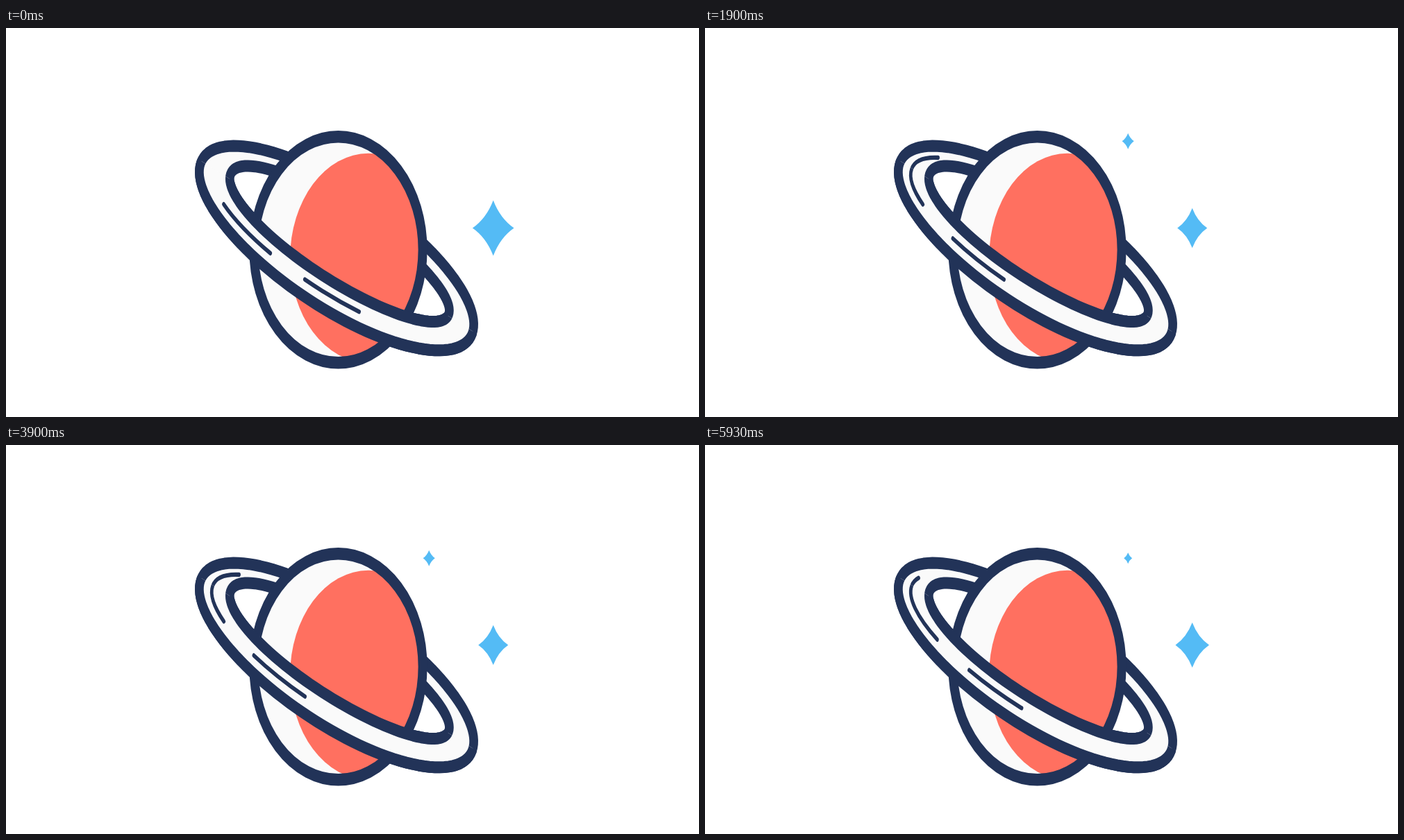
Animation of 998 by 561 pixels, one loop 6010 ms. Source, as an HTML page with a canvas:

```html
<!DOCTYPE html>
<html lang="en">
<head>
<meta charset="utf-8">
<title>Planet and rocket</title>
<style>
html, body { margin: 0; width: 100%; height: 100%; overflow: hidden; background: #fff; }
canvas { display: block; }
</style>
</head>
<body>
<canvas id="stage" width="998" height="561"></canvas>
<script>
const ctx = document.getElementById('stage').getContext('2d');
const NAVY = '#223358', CORAL = '#ff7060', BLUE = '#54bbf5', PALE = '#fafafa';
const SQUEEZE = 0.746;           // the whole drawing is narrowed horizontally
const LOOP = 6010, CYCLE = 2000;
const TILT = 25.1 * Math.PI / 180;
const FRONT_FROM = 533, FRONT_TIME = 767;   // the rocket's pass before the planet

function at(x, y, draw) {
  ctx.save();
  ctx.translate(x, y);
  ctx.scale(SQUEEZE, 1);
  draw();
  ctx.restore();
}

function stroke(width, color, path) {
  ctx.lineWidth = width;
  ctx.strokeStyle = color;
  path ? ctx.stroke(path) : ctx.stroke();
}

function line(points, width, color) {
  ctx.beginPath();
  points.forEach(([x, y]) => ctx.lineTo(x, y));
  stroke(width, color);
}

function disc(x, y, r, color) {
  ctx.beginPath();
  ctx.arc(x, y, r, 0, 7);
  ctx.fillStyle = color;
  ctx.fill();
}

function planet() {
  at(478.5, 319.8, () => {
    disc(0, 0, 163, PALE);
    ctx.save();
    ctx.clip();
    disc(58, 12, 151, CORAL);
    ctx.restore();
    ctx.beginPath();
    ctx.arc(0, 0, 163, 0, 7);
    stroke(17.4, NAVY);
  });
}

// Ellipse whose upper left side may bulge
function oval(x, y, a, b, bulge) {
  const path = new Path2D();
  for (let i = 0; i < 120; i++) {
    const c = Math.cos(i * Math.PI / 60), s = Math.sin(i * Math.PI / 60);
    path.lineTo(x + a * c, y + b * s - bulge * (1 - c) * (1 - s));
  }
  path.closePath();
  return path;
}

function ring(t) {
  const outer = oval(-1, 1, 289.5, 90, 0);
  const inner = oval(2, -4.5, 233.5, 52.5, 2);
  const band = new Path2D(outer);
  band.addPath(inner);
  ctx.fillStyle = PALE;
  ctx.fill(band, 'evenodd');
  stroke(17, NAVY, outer);
  stroke(17, NAVY, inner);

  // Two streaks running round the band
  const a = 266, b = 69.5;
  const round = Math.PI * (3 * (a + b) - Math.sqrt((3 * a + b) * (a + 3 * b)));
  ctx.beginPath();
  ctx.ellipse(0, -1, a, b, 0, Math.PI, -Math.PI, true);
  ctx.setLineDash([115, 76, 115, round - 306]);
  ctx.lineDashOffset = -(58 + t / 1000 * round) % round;
  stroke(6.4, NAVY);
  ctx.setLineDash([]);
}

function drawRing(t, frontOnly) {
  at(477, 317, () => {
    ctx.rotate(TILT);
    if (frontOnly) {
      ctx.beginPath();
      ctx.rect(-320, -2, 640, 140);
      ctx.clip();
    }
    ring(t);
  });
}

// One orbit per cycle: a quick half in front, a slow half behind
function orbit(t) {
  const u = (t - FRONT_FROM + CYCLE) % CYCLE;
  const near = u < FRONT_TIME;
  const p = Math.PI * (near ? u / FRONT_TIME : 1 + (u - FRONT_TIME) / (CYCLE - FRONT_TIME));
  const turn = Math.PI / 2 * Math.cos(p) ** 5;
  return {
    near,
    x: 474 - 166 * Math.cos(p),
    y: 201 + 54 * Math.sin(p) ** 2,
    angle: near ? turn : Math.PI - turn
  };
}

function rocket({ x, y, angle }) {
  at(x, y, () => {
    ctx.rotate(angle);
    ctx.beginPath();
    ctx.moveTo(-54, -18);
    ctx.quadraticCurveTo(-80, -14, -99, -1);
    ctx.quadraticCurveTo(-80, 13, -54, 16);
    stroke(8, CORAL);

    for (const s of [-1, 1]) line([[14, 23 * s], [-3, 37 * s], [-23, 37 * s]], 8, NAVY);
    line([[-37, -15], [-37, 15]], 12, NAVY);
    line([[-26, -17], [-26, 18]], 10, NAVY);

    ctx.beginPath();
    ctx.moveTo(98, 1);
    for (const s of [-1, 1]) {
      const from = s < 0 ? 73 : 89, to = s < 0 ? 50 : 98;
      if (s > 0) {
        ctx.lineTo(-20, 19);
        ctx.lineTo(50, 26);
        ctx.quadraticCurveTo(63, 27, 73, 21);
      }
      ctx.quadraticCurveTo(s < 0 ? 89 : from, 12 * s, s < 0 ? from : to, s < 0 ? -21 : 1);
      if (s < 0) {
        ctx.quadraticCurveTo(63, -27, to, -26);
        ctx.lineTo(-20, -20);
      }
    }
    ctx.closePath();
    ctx.fillStyle = BLUE;
    ctx.fill();
    stroke(9, NAVY);
    disc(53, 0, 11.4, PALE);
  });
}

function star(x, y, r) {
  if (r < 0.3) return;
  at(x, y, () => {
    const c = 0.34 * r;
    ctx.beginPath();
    ctx.moveTo(0, -r);
    ctx.quadraticCurveTo(c, -c, r, 0);
    ctx.quadraticCurveTo(c, c, 0, r);
    ctx.quadraticCurveTo(-c, c, -r, 0);
    ctx.quadraticCurveTo(-c, -c, 0, -r);
    ctx.fillStyle = BLUE;
    ctx.fill();
  });
}

function draw(t) {
  ctx.fillStyle = '#fff';
  ctx.fillRect(0, 0, 998, 561);
  ctx.lineCap = ctx.lineJoin = 'round';
  const ship = orbit(t);
  if (!ship.near) rocket(ship);
  drawRing(t, false);
  planet();
  drawRing(t, true);
  if (ship.near) rocket(ship);

  const beat = t % 500 / 500;
  star(701.7, 288.5, 12 + 28 * Math.abs(1 - 2 * beat));
  star(609.2, 163.2, 19.5 * Math.sin(Math.PI * beat));
}

// Two pictures per 100 ms, held for 30 and 70 ms
function step(ms) {
  const t = Math.min(ms % LOOP, 5999);
  const base = Math.floor(t / 100) * 100;
  return (t - base < 30 ? base : base + 100 / 3) % CYCLE;
}

const start = performance.now();
function tick() {
  draw(step(performance.now() - start));
  requestAnimationFrame(tick);
}
tick();
</script>
</body>
</html>
```
